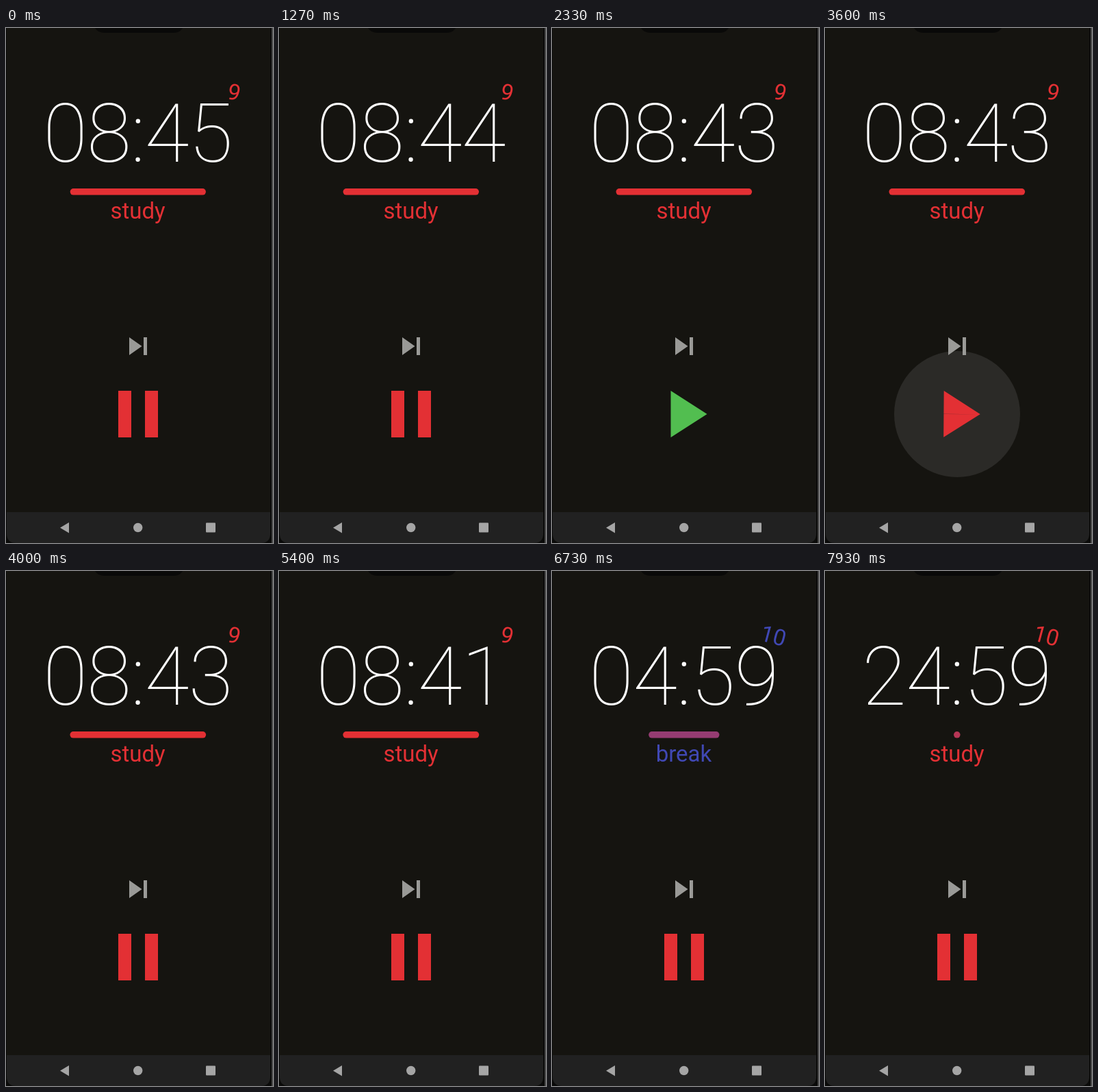
An HTML page that plays this animation: 390 by 751 pixels, repeating every 8000 ms.

```html
<!DOCTYPE html>
<html lang="en">
<head>
<meta charset="utf-8">
<title>Study timer</title>
<style>
  html, body { margin: 0; width: 100%; height: 100%; overflow: hidden; background: #0a0a09; }
  svg { display: block; width: 390px; height: 751px; }
  text { font-family: Roboto, sans-serif; text-anchor: middle; }
  #clock { font-size: 118px; font-weight: 100; fill: #fff; }
  #label, #badge { font-size: 33px; }
</style>
</head>
<body>
<svg viewBox="0 0 390 751">
  <rect x="388" width="2" height="751" fill="#4a4a4a"/>
  <path d="M1 0H386V737Q386 751 372 751H15Q1 751 1 737Z" fill="#151410"/>
  <path d="M1 706H386V737Q386 751 372 751H15Q1 751 1 737Z" fill="#212121"/>
  <path d="M130 0Q134 7 144 7H244Q254 7 258 0Z" fill="#090908"/>
  <g fill="#a5a5a5">
    <path d="M79 728.7L92 721V736.5Z"/>
    <circle cx="192.7" cy="728.5" r="6.7"/>
    <rect x="292" y="721.5" width="14" height="14" rx="1"/>
  </g>

  <text id="clock" x="86.5 150.5 193 235 299" y="195"></text>
  <text id="badge"></text>
  <line id="bar" y1="238.8" y2="238.8" stroke-width="9.5" stroke-linecap="round"/>
  <text id="label" x="192.5" y="278"></text>

  <circle id="toggleRipple" cx="193" cy="563" fill="#fff"/>
  <circle id="skipRipple" cx="193" cy="464" fill="#fff"/>
  <path d="M180 451L198.5 464L180 477ZM201 451H206V477H201Z" fill="#9a9a97"/>
  <path id="toggle"/>
</svg>
<script>
const LOOP = 8000;
const RED = [227, 48, 52], BLUE = [64, 72, 180], GREEN = [82, 190, 80];
const PAUSE_AT = 1890, RESUME_AT = 3585, MORPH = 410;
const BREAK_AT = 6250, STUDY_AT = 7200, BAR_TIME = 1000;
const TICKS = [468, 1468, 4398, 5398];
const FULL_BAR = 305, SESSION = 1500;

const $ = id => document.getElementById(id);
const clamp = v => Math.max(0, Math.min(1, v));
const lerp = (a, b, p) => a + (b - a) * p;
const smooth = p => p * p * (3 - 2 * p);
const mix = (a, b, p) => a.map((v, i) => lerp(v, b[i], p));
const rgb = c => `rgb(${c.map(Math.round)})`;
const set = (el, attrs) => Object.entries(attrs).forEach(([k, v]) => el.setAttribute(k, v));
const two = n => String(n).padStart(2, '0');

// Corners of the left half: a pause bar, and half of a triangle pointing down.
const BAR = [[-29, -34], [-10, -34], [-10, 34], [-29, 34]];
const HALF = [[-34, -19.5], [0, -19.5], [0, 33.5], [0, 33.5]];

function drawToggle(t) {
  const play = smooth(clamp((t - PAUSE_AT) / MORPH)) - smooth(clamp((t - RESUME_AT) / MORPH));
  const half = BAR.map((c, i) => mix(c, HALF[i], play));
  const outline = side => 'M' + half.map(([x, y]) => `${x * side} ${y}`).join('L') + 'Z';
  set($('toggle'), {
    d: outline(1) + outline(-1),
    transform: `translate(193 563) rotate(${-90 * play})`,
    fill: rgb(t >= PAUSE_AT && t < RESUME_AT ? GREEN : RED)
  });
}

function drawRipple(el, radius, t, presses) {
  const press = presses.find(([start, end]) => t >= start && t < end);
  if (!press) return set(el, { r: 0 });
  const [start, end] = press;
  set(el, {
    r: radius * lerp(0.5, 1, clamp((t - start) / 100)),
    'fill-opacity': 0.095 * Math.min(clamp((t - start) / 70), clamp((end - t) / 240))
  });
}

function drawTimer(t) {
  const onBreak = t >= BREAK_AT && t < STUDY_AT;
  const skipped = t >= BREAK_AT;
  const color = rgb(onBreak ? BLUE : RED);
  const left = onBreak ? 299 : skipped ? 1499 : 525 - TICKS.filter(k => t >= k).length;
  $('clock').textContent = two(Math.floor(left / 60)) + ':' + two(left % 60);

  $('label').textContent = onBreak ? 'break' : 'study';
  $('label').setAttribute('fill', color);

  $('badge').textContent = skipped ? 10 : 9;
  set($('badge'), {
    y: 11.7, fill: color,
    transform: `translate(${skipped ? '323.5 94.3' : '333.3 93.5'}) rotate(15)`
  });

  // The bar glides toward each new value for one second.
  const elapsed = SESSION - 525 + TICKS.reduce((sum, k) => sum + clamp((t - k) / BAR_TIME), 0);
  const shrink = clamp((t - BREAK_AT) / BAR_TIME);
  const width = FULL_BAR * elapsed / SESSION * (1 - shrink);
  const reach = Math.max(0.01, (width - 9.5) / 2);
  const tint = mix(mix(RED, BLUE, shrink), RED, clamp((t - STUDY_AT) / BAR_TIME));
  set($('bar'), { x1: 192.8 - reach, x2: 192.8 + reach, stroke: rgb(tint) });
}

function frame() {
  const t = performance.now() % LOOP;
  drawTimer(t);
  drawToggle(t);
  drawRipple($('toggleRipple'), 92, t, [[1830, 2260], [3390, 3960]]);
  drawRipple($('skipRipple'), 47, t, [[5790, 6090], [7120, 7420]]);
  requestAnimationFrame(frame);
}
frame();
</script>
</body>
</html>
```
